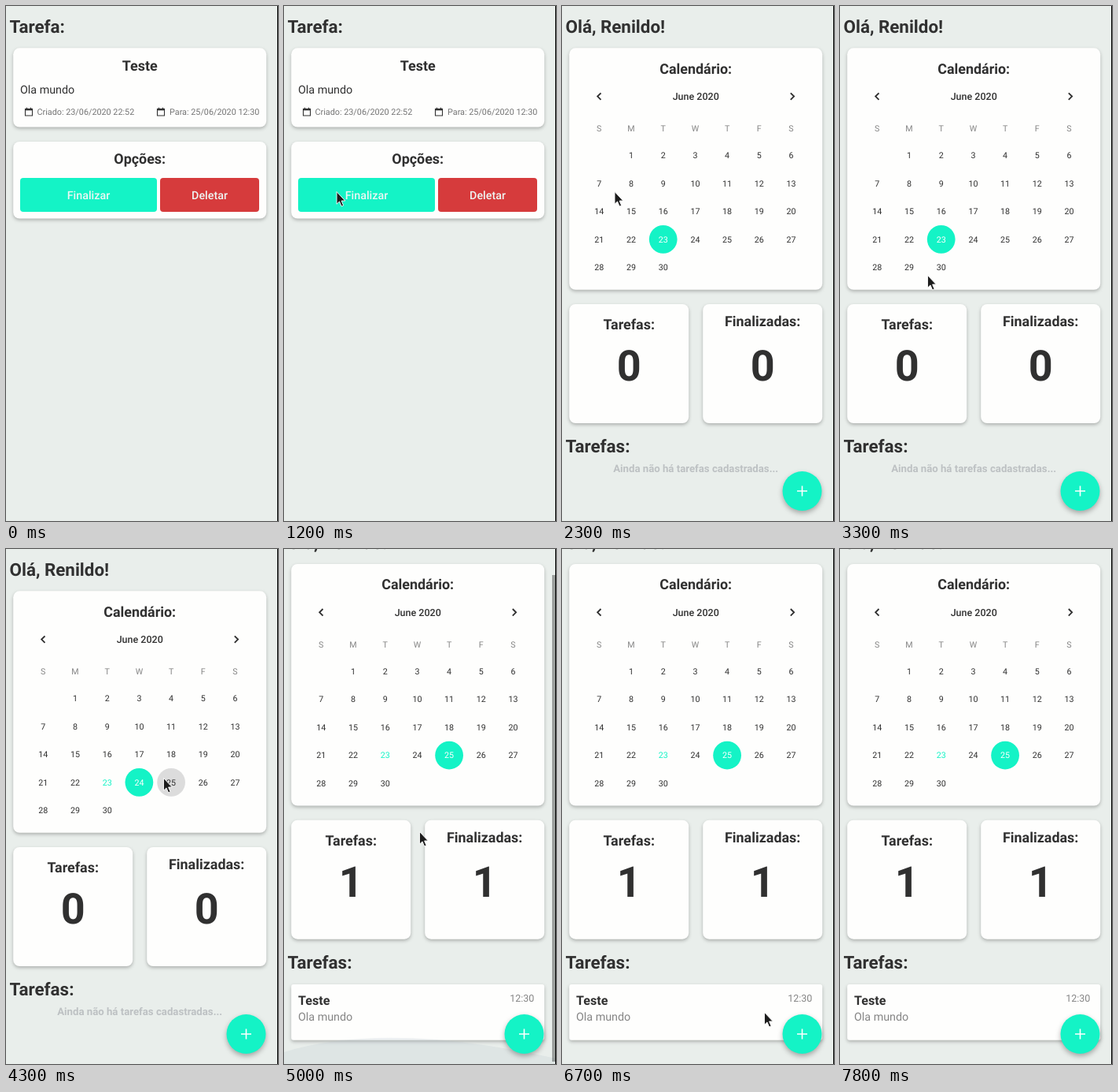
These frames come from a looping animation (346x653 px, 8.5 s). An HTML page:

```html
<!DOCTYPE html>
<html lang="pt">
<head>
<meta charset="utf-8">
<title>Tarefas</title>
<style>
  html, body { margin: 0; width: 100%; height: 100%; overflow: hidden; background: #e9eeeb; }
  svg { display: block; width: 346px; height: 653px; font-family: Roboto, sans-serif; text-rendering: geometricPrecision; }
  .card { fill: #fefefd; filter: drop-shadow(0 2px 2px rgba(0, 0, 0, .26)); }
  .fab { filter: drop-shadow(0 3px 3px rgba(0, 0, 0, .3)); }
</style>
</head>
<body>
<svg id="stage" viewBox="0 0 346 653"></svg>
<script>
const LOOP = 8500, STEP = 100;
const DARK = '#303030', GREY = '#858585', MINT = '#14f3c6', BG = '#e9eeeb';
const LEFT = 9.2, WIDTH = 322, MID = LEFT + WIDTH / 2;
const stage = document.getElementById('stage');

// Stops of the pointer: arrival time, x, y. Each trip takes at most TRIP ms.
const TRIP = 400;
const stops = [
  [700, 6, 227], [1200, 66.5, 235], [3300, 111, 341], [3700, 168, 282], [4300, 200, 290],
  [4800, 191, 395], [5000, 172, 358], [5700, 69, 427], [5900, 185, 448], [6400, 88, 560],
  [6700, 257, 587], [7500, 260, 587], [7700, 94, 25]
];

const clamp = v => Math.max(0, Math.min(1, v));
const ramp = (t, start, length) => clamp((t - start) / length);

function text(x, y, size, str, { fill = DARK, weight = 400, anchor = 'middle' } = {}) {
  return `<text x="${x}" y="${y}" font-size="${size}" fill="${fill}" font-weight="${weight}" text-anchor="${anchor}">${str}</text>`;
}
const title = (y, str) => text(4.5, y, 22.4, str, { weight: 700, anchor: 'start' });
const heading = (x, y, str) => text(x, y, 17.9, str, { weight: 700 });
const rect = (x, y, w, h, fill, r = 0) =>
  `<rect x="${x}" y="${y}" width="${w}" height="${h}" rx="${r}" fill="${fill}"/>`;
const card = (y, h, { x = LEFT, w = WIDTH, r = 8 } = {}) =>
  `<rect class="card" x="${x}" y="${y}" width="${w}" height="${h}" rx="${r}"/>`;
const disc = (x, y, r, fill) => `<circle cx="${x}" cy="${y}" r="${r}" fill="${fill}"/>`;
const line = (d, color, width) =>
  `<path d="${d}" fill="none" stroke="${color}" stroke-width="${width}"/>`;

function dateIcon(x) {
  return line(`M${x + .5} 130.5h9v8.5h-9z`, DARK, 1.1) + rect(x, 130, 10, 2.4, DARK) +
    line(`M${x + 2.5} 128.7v2m5 -2v2`, DARK, 1.2);
}

function button(x, w, fill, label) {
  return rect(x, 218, w, 43, fill, 4) +
    text(x + w / 2, 245, 14.3, label, { fill: '#eef6f3', weight: 500 });
}

function details() {
  const fill = '#737373';
  return title(34, 'Tarefa:') +
    card(53.3, 100.3) + heading(MID, 81.5, 'Teste') +
    text(18, 111, 14.3, 'Ola mundo', { anchor: 'start' }) +
    dateIcon(24) + text(39.5, 138, 10.8, 'Criado: 23/06/2020 22:52', { fill, anchor: 'start' }) +
    dateIcon(192) + text(322.3, 138, 10.8, 'Para: 25/06/2020 12:30', { fill, anchor: 'end' }) +
    card(172, 97.5) + heading(MID, 200, 'Opções:') +
    button(18, 174, MINT, 'Finalizar') + button(196, 126, '#d63b3c', 'Deletar');
}

function calendar(selected, pressed) {
  const colX = c => 47.3 + 40.7 * c;
  let out = card(53.3, 306.5) + heading(MID, 85.5, 'Calendário:') +
    text(MID, 119, 12.5, 'June 2020', { weight: 500 }) +
    line('M49.5 110.3l-4.3 4.3 4.3 4.3M290.8 110.3l4.3 4.3 -4.3 4.3', DARK, 1.9);
  [...'SMTWTFS'].forEach((d, c) => out += text(colX(c), 159, 10.7, d, { fill: GREY }));
  for (let day = 1; day <= 30; day++) {
    const x = colX(day % 7), y = 189.2 + 35.55 * Math.floor(day / 7);
    let fill = day === 23 ? MINT : DARK;
    if (day === pressed) out += disc(x, y, 17.9, '#dcdcdc');
    if (day === selected) {
      out += disc(x, y, 17.9, MINT);
      fill = '#fff';
    }
    out += text(x, y + 3.9, 10.7, day, { fill });
  }
  return out;
}

function counter(x, y, label, value) {
  return card(378, 151, { x: x - 76, w: 152 }) + heading(x, y, label) +
    text(x, 475, 54, value, { weight: 700 });
}

function taskCard() {
  return card(586.3, 70.7, { r: 3 }) +
    text(18, 612.3, 16.1, 'Teste', { weight: 700, anchor: 'start' }) +
    text(18, 632, 14.3, 'Ola mundo', { fill: GREY, anchor: 'start' }) +
    text(318.3, 608.5, 12.5, '12:30', { fill: GREY, anchor: 'end' });
}

function home(t) {
  const selected = t < 4000 ? 23 : t < 4400 ? 24 : 25;
  const pressed = t === 3900 ? 24 : t === 4300 ? 25 : 0;
  const found = t >= 4400;
  const scroll = t >= 5000 ? 34.3 : 0;
  const scale = 1 - .025 * (1 - ramp(t, 2000, 300)) ** 3;
  const glow = 1 - ramp(t, 5000, 600);
  const bar = 1 - ramp(t, 5300, 300);

  let out = `<g transform="translate(172 330) scale(${scale}) translate(-172 -330)">
    <g transform="translate(0 ${-scroll})">` +
    title(34, 'Olá, Renildo!') + calendar(selected, pressed) +
    counter(85.2, 410, 'Tarefas:', +found) + counter(255.2, 406, 'Finalizadas:', +found) +
    title(566.2, 'Tarefas:') +
    (found ? taskCard() : text(MID, 591, 13.2, 'Ainda não há tarefas cadastradas...', { fill: '#bdc1c3', weight: 700 })) +
    '</g>';
  if (scroll)
    out += `<path d="M0 638Q130 598 346 646V653H0z" fill="#aebcc6" opacity="${.2 * glow}"/>`;
  out += `<g class="fab">${disc(305.5, 615, 25, MINT)}</g>` +
    line('M299 615h13m-6.5 -6.5v13', '#fff', 1.6);
  if (scroll)
    out += `<g opacity="${.33 * bar}">${rect(341, 33, 4, 617, '#000')}</g>`;
  // While the screen zooms in, its surroundings show at the bottom and right.
  if (scale < 1)
    out += rect(-20, 655, 400, 30, '#000') + rect(345, -20, 12, 720, '#cfd3d1');
  return out + '</g>';
}

function pointer(t) {
  const next = stops.findIndex(s => s[0] >= t);
  if (t < stops[0][0] || next < 0) return '';
  const [t1, x1, y1] = stops[next];
  const [t0, x0, y0] = stops[Math.max(0, next - 1)];
  const trip = Math.min(TRIP, t1 - t0) || 1;
  const k = ramp(t, t1 - trip, trip);
  const x = x0 + (x1 - x0) * k, y = y0 + (y1 - y0) * k;
  return `<path transform="translate(${x} ${y})" d="M.5 .5V16.2L4 12.9 6.6 19 9.1 17.9 6.6 12H11.3z"
    fill="#1c1c1c" stroke="#fff" stroke-width=".9"/>`;
}

let shown = -1;
function frame(now) {
  // The picture advances ten times a second.
  const t = Math.floor(now % LOOP / STEP) * STEP;
  if (t !== shown) {
    shown = t;
    stage.innerHTML = rect(0, 0, 346, 653, BG) + (t < 2000 ? details() : home(t)) +
      rect(345, 0, 1, 653, '#000') + pointer(t);
  }
  requestAnimationFrame(frame);
}
frame(performance.now());
</script>
</body>
</html>
```
